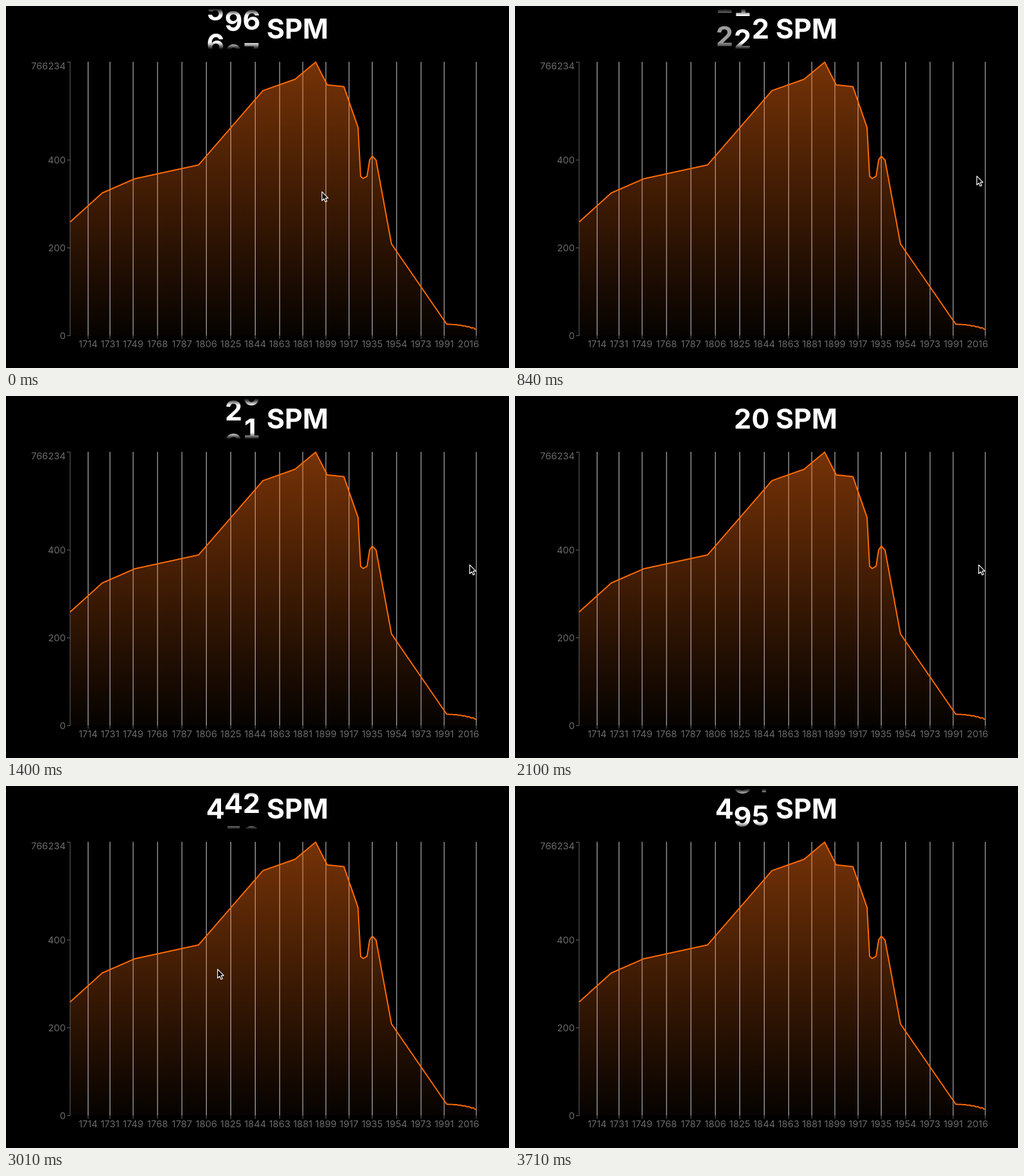
An HTML page with a canvas that plays this animation: 800x577 px, repeating every 3.78 s.

```html
<!DOCTYPE html>
<html lang="en">
<head>
<meta charset="utf-8">
<title>SPM chart</title>
<style>
  html, body { margin: 0; width: 100%; height: 100%; overflow: hidden; background: #000; }
  canvas { position: absolute; left: 0; top: 0; display: block; }
  #counter, #unit {
    position: absolute; color: #fff;
    font: 700 44px/53px Inter, sans-serif;
    font-optical-sizing: none;
    font-variant-numeric: tabular-nums;
    white-space: nowrap;
  }
  #unit { left: 414.5px; top: 9.6px; }
  #counter {
    left: 310px; top: 4px; width: 100px; height: 65px; overflow: hidden;
    -webkit-mask-image: linear-gradient(transparent, #000 11px, #000 54px, transparent);
    mask-image: linear-gradient(transparent, #000 11px, #000 54px, transparent);
  }
  .wheel { position: absolute; top: 5.6px; width: 40px; height: 53px; text-align: center; }
  .wheel span { position: absolute; left: 0; top: 0; width: 100%; }
</style>
</head>
<body>
<canvas id="chart" width="800" height="577"></canvas>
<div id="counter"></div>
<div id="unit">SPM</div>
<script>
const LOOP = 3780, STEP = 70, PITCH = 53;
const LEFT = 102, RIGHT = 748, TOP = 89, BOTTOM = 525.5;
const FIRST_YEAR = 1700, LAST_YEAR = 2016, TAIL_YEAR = 1993;
const ctx = document.getElementById('chart').getContext('2d');
const counter = document.getElementById('counter');

const yearX = year => LEFT + (year - FIRST_YEAR) * (RIGHT - LEFT) / (LAST_YEAR - FIRST_YEAR);
const valueY = value => BOTTOM - value * 0.7;

const tickYears = '1714 1731 1749 1768 1787 1806 1825 1844 1863 1881 1899 1917 1935 1954 1973 1991 2016'.split(' ');

// Turning points of the series, as year and value.
const series = [
  [1700, 259], [1725, 325], [1750, 357], [1800, 389], [1850, 558], [1875, 584],
  [1891, 623], [1900, 571], [1913, 567], [1924, 474], [1926, 363], [1928, 358],
  [1931, 363], [1933, 400], [1935, 409], [1938, 400], [1950, 209]
];
for (let year = TAIL_YEAR; year <= LAST_YEAR; year++) {
  const age = year - TAIL_YEAR;
  series.push([year, 26 - 0.021 * age * age + Math.sin(age * 1.9) * age / 18]);
}
const curve = series.map(([year, value]) => [yearX(year), valueY(value)]);

// Key poses: pointer position and the turn of each digit wheel.
const poses = [
  { t: 0, x: 502, y: 295.5, wheels: [5.54, 9.22, 6.26] },
  { t: 490, x: 595, y: 288.5, wheels: [4.28, 6.83, 0.83] },
  { t: 840, x: 734, y: 270.5, wheels: [1.78, 1.67, 2] },
  { t: 1400, x: 737, y: 268.5, wheels: [0, 2.24, 0.7] },
  { t: 2100, x: 737, y: 268.5, wheels: [0, 2, 0] },
  { t: 3010, x: 336, y: 291.5, wheels: [4, 4.17, 2.17] },
  { t: 3710, x: 371, y: 660, wheels: [4, 8.76, 4.8] }
];

// Monotone cubic through one property of the poses.
function sample(t, read) {
  const last = poses.length - 1;
  if (t >= poses[last].t) return read(poses[last]);
  const slope = k => k < 0 || k >= last ? 0
    : (read(poses[k + 1]) - read(poses[k])) / (poses[k + 1].t - poses[k].t);
  const tangent = k => {
    const a = slope(k - 1), b = slope(k);
    return a * b > 0 ? 2 * a * b / (a + b) : 0;
  };
  const i = poses.findIndex(pose => pose.t > t) - 1;
  const span = poses[i + 1].t - poses[i].t, u = (t - poses[i].t) / span;
  const m0 = (i === 0 ? slope(0) : tangent(i)) * span;
  const m1 = tangent(i + 1) * span;
  const d = slope(i) * span;
  return read(poses[i]) + u * (m0 + u * (3 * d - 2 * m0 - m1 + u * (m0 + m1 - 2 * d)));
}

function line(x0, y0, x1, y1) {
  ctx.beginPath();
  ctx.moveTo(x0, y0);
  ctx.lineTo(x1, y1);
  ctx.stroke();
}

function tracePath(points) {
  ctx.beginPath();
  points.forEach(([x, y]) => ctx.lineTo(x, y));
}

function drawAxes() {
  ctx.font = '15px Inter, sans-serif';
  ctx.fillStyle = '#6a6a6a';
  ctx.strokeStyle = '#666';
  ctx.lineWidth = 1;
  line(LEFT, TOP, LEFT, BOTTOM);

  const yLabel = (label, tickY, textY) => {
    line(97, tickY, LEFT, tickY);
    ctx.fillText(label, 95, textY + 5.5);
  };
  ctx.textAlign = 'right';
  yLabel('766234', TOP + 0.5, TOP + 6);
  for (const value of [400, 200, 0]) yLabel(value, valueY(value), valueY(value));

  ctx.textAlign = 'center';
  for (const year of tickYears) {
    const x = yearX(year);
    line(x, BOTTOM, x, BOTTOM + 5);
    ctx.fillText(year, Math.min(x, 735.5), 544);
  }
}

function drawChart() {
  ctx.strokeStyle = '#d4d4d4';
  ctx.lineWidth = 1;
  for (const year of tickYears) line(yearX(year), TOP, yearX(year), BOTTOM);

  const fill = ctx.createLinearGradient(0, TOP, 0, BOTTOM);
  fill.addColorStop(0, 'rgba(255,110,15,0.46)');
  fill.addColorStop(1, 'rgba(255,110,15,0.025)');
  tracePath([...curve, [RIGHT, BOTTOM], [LEFT, BOTTOM]]);
  ctx.fillStyle = fill;
  ctx.fill();

  drawAxes();
  tracePath(curve);
  ctx.strokeStyle = '#ff6b00';
  ctx.lineWidth = 2;
  ctx.lineJoin = 'round';
  ctx.stroke();
}

function drawPointer(x, y) {
  ctx.save();
  ctx.translate(x + 0.5, y + 0.7);
  tracePath([[0, 0], [0, 14], [3.2, 11], [5.5, 16], [7.8, 15], [5.6, 10], [9.8, 10]]);
  ctx.closePath();
  ctx.fillStyle = '#000';
  ctx.strokeStyle = '#fff';
  ctx.lineWidth = 1.2;
  ctx.fill();
  ctx.stroke();
  ctx.restore();
}

const wheels = [0, 1, 2].map(index => {
  const node = document.createElement('div');
  node.className = 'wheel';
  node.style.left = 3.3 + index * 28.6 + 'px';
  const digits = [0, 1].map(() => node.appendChild(document.createElement('span')));
  counter.appendChild(node);
  return { node, digits };
});

function turnWheel(digits, position) {
  const base = Math.floor(position);
  digits.forEach((digit, k) => {
    digit.textContent = (base + k) % 10;
    digit.style.transform = `translateY(${(base + k - position) * PITCH}px)`;
  });
}

function render(elapsed) {
  const t = Math.floor(elapsed % LOOP / STEP) * STEP;
  ctx.fillStyle = '#000';
  ctx.fillRect(0, 0, 800, 577);
  drawChart();
  drawPointer(sample(t, pose => pose.x), sample(t, pose => pose.y));
  wheels.forEach(({ digits }, i) => turnWheel(digits, sample(t, pose => pose.wheels[i])));
  // The leading digit fades out as it rolls down to zero.
  wheels[0].node.style.opacity = Math.min(1, sample(t, pose => pose.wheels[0]) / 2.9);
}

let start;
function tick(now) {
  start ??= now;
  render(now - start);
  requestAnimationFrame(tick);
}
render(0);
requestAnimationFrame(tick);
</script>
</body>
</html>
```
